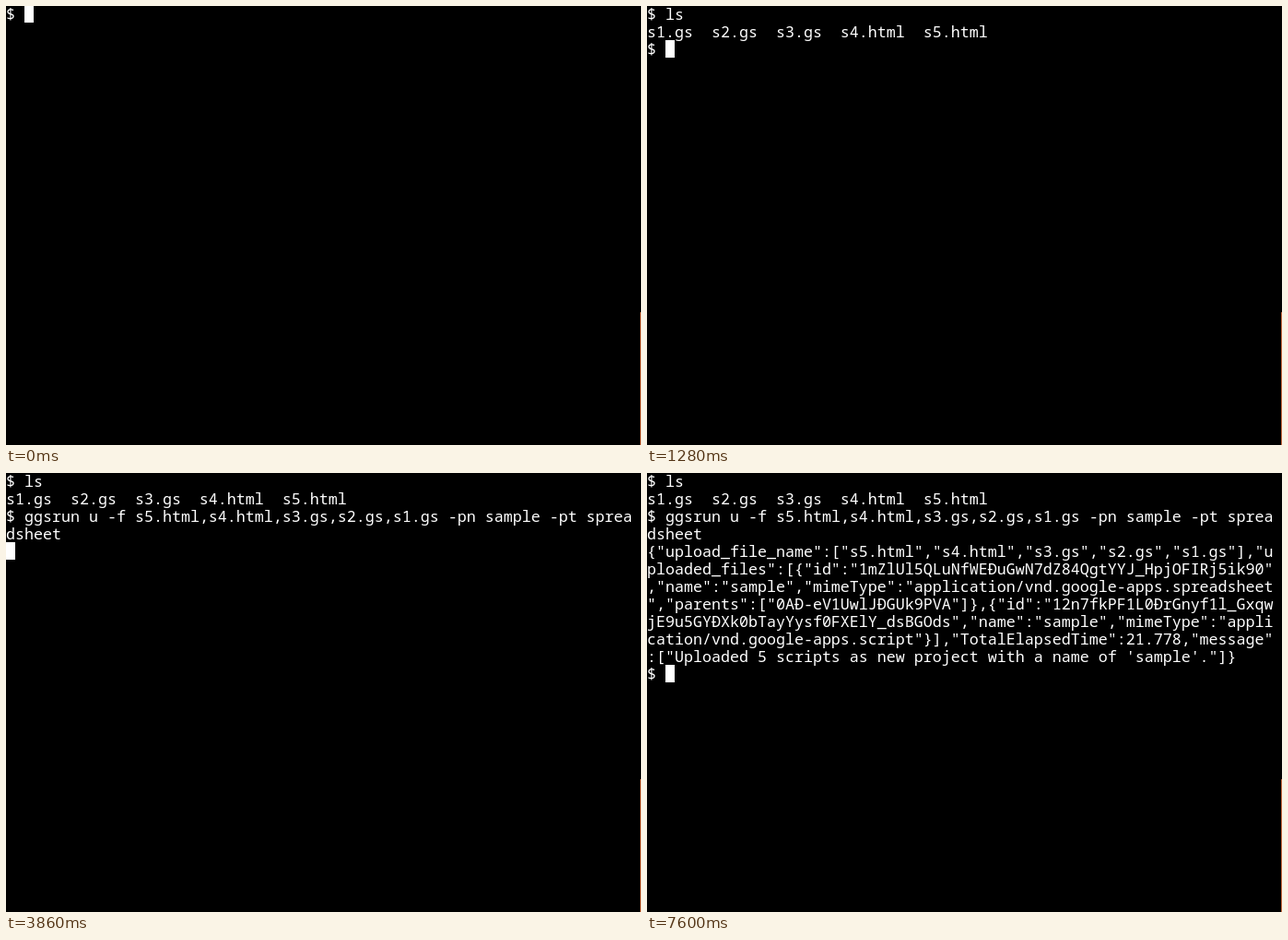
Recreate the animation shown at these times as an HTML page. Size 689x476 px, loop 8 s.

```html
<!DOCTYPE html>
<html lang="en">
<head>
<meta charset="utf-8">
<title>Terminal session</title>
<style>
  html, body {
    margin: 0;
    width: 100%;
    height: 100%;
    overflow: hidden;
    background: #000;
  }
  /* Cells are 10 x 19 px; the first row starts one pixel above the stage. */
  .screen {
    position: absolute;
    top: -1px;
    left: 0;
    margin: 0;
    color: #fff;
    font: 16.667px/19px "Noto Sans Mono", monospace;
    font-variant-ligatures: none;
    white-space: pre;
  }
  .edge {
    position: absolute;
    left: 688px;
    top: 332px;
    width: 1px;
    height: 144px;
    background: #c4683c;
  }
  .cursor {
    position: absolute;
    top: 0;
    left: 0;
    width: 10px;
    height: 19px;
    background: #fff;
  }
  .screen span, .cursor {
    animation: 8s step-end infinite;
  }
  .key-l { animation-name: key-l !important; }
  .key-s { animation-name: key-s !important; }
  .listing { animation-name: listing !important; }
  .command { animation-name: command !important; }
  .result { animation-name: result !important; }
  .cursor { animation-name: cursor; }

  @keyframes key-l { 0% { opacity: 0 } 6.25%, 100% { opacity: 1 } }
  @keyframes key-s { 0% { opacity: 0 } 7.25%, 100% { opacity: 1 } }
  @keyframes listing { 0% { opacity: 0 } 16%, 100% { opacity: 1 } }
  @keyframes command { 0% { opacity: 0 } 35.625%, 100% { opacity: 1 } }
  @keyframes result { 0% { opacity: 0 } 65.875%, 100% { opacity: 1 } }

  @keyframes cursor {
    0% { transform: translate(20px, 0); opacity: 1 }
    6.25% { transform: translate(30px, 0); opacity: 1 }
    7.25% { transform: translate(40px, 0); opacity: 1 }
    14.125% { transform: translate(40px, 0); opacity: 0 }
    16%, 27.875% { transform: translate(20px, 38px); opacity: 1 }
    22.875% { transform: translate(20px, 38px); opacity: 0 }
    35.625% { transform: translate(60px, 57px); opacity: 0 }
    43.25% { transform: translate(60px, 57px); opacity: 1 }
    48.25% { transform: translate(0, 76px); opacity: 1 }
    65.875%, 80.5%, 95%, 100% { transform: translate(20px, 209px); opacity: 1 }
    72.5%, 88.125% { transform: translate(20px, 209px); opacity: 0 }
  }
</style>
</head>
<body>
<div class="edge"></div>
<div class="screen">$ <span class="key-l">l</span><span class="key-s">s</span><span class="listing">
s1.gs  s2.gs  s3.gs  s4.html  s5.html
$ </span><span class="command">ggsrun u -f s5.html,s4.html,s3.gs,s2.gs,s1.gs -pn sample -pt sprea
dsheet</span><span class="result">
{"upload_file_name":["s5.html","s4.html","s3.gs","s2.gs","s1.gs"],"u
ploaded_files":[{"id":"1mZlUl5QLuNfWEĐuGwN7dZ84QgtYYJ_HpjOFIRj5ik90"
,"name":"sample","mimeType":"application/vnd.google-apps.spreadsheet
","parents":["0AĐ-eV1UwlJĐGUk9PVA"]},{"id":"12n7fkPF1L0ĐrGnyf1l_Gxqw
jE9u5GYĐXk0bTayYysf0FXElY_dsBGOds","name":"sample","mimeType":"appli
cation/vnd.google-apps.script"}],"TotalElapsedTime":21.778,"message"
:["Uploaded 5 scripts as new project with a name of 'sample'."]}
$ </span><div class="cursor"></div></div>
</body>
</html>
```
